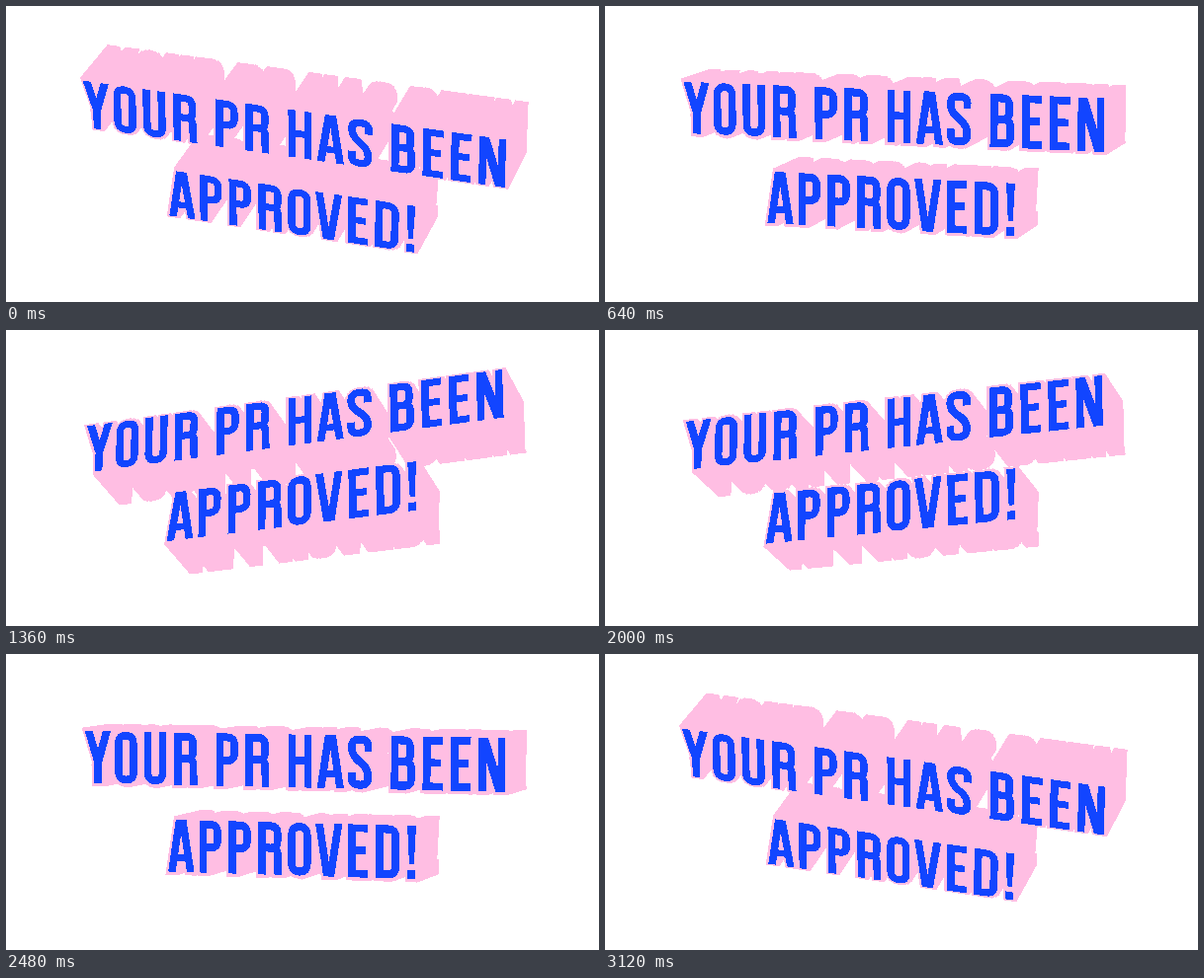
Animation, 600 px wide and 300 px high, one loop 3200 ms. Source, as an HTML page:

```html
<!DOCTYPE html>
<html lang="en">
<head>
<meta charset="utf-8">
<title>Your PR has been approved!</title>
<style>
  html, body { margin: 0; width: 100%; height: 100%; overflow: hidden; background: #fff; }
  svg { display: block; width: 100vw; height: 100vh; }
  path { shape-rendering: crispEdges; }
  #block { fill: #ffbee3; stroke: #ffbee3; stroke-width: 7.6; stroke-miterlimit: 2; }
  #face { fill: #1245ff; }
</style>
</head>
<body>
<svg viewBox="0 0 600 300" role="img" aria-label="Your PR has been approved!">
  <path id="block"/>
  <path id="face"/>
</svg>
<script>
const LINES = ["YOUR PR HAS BEEN", "APPROVED!"];
const LOOP = 3200, STEP = 80;
const CAP = 53, STEM = 8, HALF_HEIGHT = 70.7, SPACE = 12.5, TRACKING = 0.2;
const YAW = 17 * Math.PI / 180, PITCH = 28 * Math.PI / 180;
const HALF_DEPTH = 36, BEVEL = 5, CAMERA = 3000;

// Every letter is a union of convex pieces.
const slant = (top, bottom, y0 = 0, y1 = CAP, w = STEM) =>
  [[[top, y0], [top + w, y0], [bottom + w, y1], [bottom, y1]]];
const stem = (x, y0, y1) => slant(x, x, y0, y1);
const bar = (y, x0, x1, h = 7.6) => slant(x0, x0, y, y + h, x1 - x0);

function roundCorners(points, radius) {
  const toward = (a, b) => {
    const len = Math.hypot(b[0] - a[0], b[1] - a[1]);
    const k = Math.min(radius, len / 2) / len;
    return [a[0] + (b[0] - a[0]) * k, a[1] + (b[1] - a[1]) * k];
  };
  const out = [points[0]];
  for (let i = 1; i < points.length - 1; i++) {
    const c = points[i], a = toward(c, points[i - 1]), b = toward(c, points[i + 1]);
    for (let s = 0; s <= 6; s++) {
      const u = s / 6, v = 1 - u;
      out.push([0, 1].map(k => v * v * a[k] + 2 * u * v * c[k] + u * u * b[k]));
    }
  }
  out.push(points[points.length - 1]);
  return out.filter((p, i) => !i || Math.hypot(p[0] - out[i - 1][0], p[1] - out[i - 1][1]) > 0.01);
}

// A stroke of stem width along a rounded polyline, cut into quads.
function curve(points, radius = 8) {
  const line = roundCorners(points, radius);
  const rims = line.map((p, i) => {
    const a = line[Math.max(0, i - 1)], b = line[Math.min(line.length - 1, i + 1)];
    const dx = b[0] - a[0], dy = b[1] - a[1], k = STEM / 2 / Math.hypot(dx, dy);
    return [[p[0] - dy * k, p[1] + dx * k], [p[0] + dy * k, p[1] - dx * k]];
  });
  return rims.slice(1).map((r, i) => [rims[i][0], r[0], r[1], rims[i][1]]);
}

const TOP = 4, BASE = CAP - 4;
const bowl = (x, y0, y1, r) => curve([[4, y0], [x, y0], [x, y1], [4, y1]], r);
const glyph = (width, left, right, ...parts) => ({ width, left, right, pieces: parts.flat() });

const GLYPHS = {
  " ": glyph(SPACE, 0, 0),
  "!": glyph(9, 4, 4, [[[0, 0], [9, 0], [7, 38], [2, 38]]], stem(0.5, 44)),
  A: glyph(28, 1.2, 1.2, slant(8.3, 0), slant(11.7, 20), bar(35, 5, 23, 7.2)),
  B: glyph(24.5, 4, 3.6, stem(0), bowl(19.5, TOP, 25, 7), bowl(20.5, 25, BASE, 7)),
  D: glyph(24.5, 4, 3.6, stem(0), bowl(20.5, TOP, BASE)),
  E: glyph(20.5, 4, 3.6, stem(0), bar(0, 0, 20.5), bar(22, 0, 18.5), bar(CAP - 7.6, 0, 20.5)),
  H: glyph(24.5, 4, 4, stem(0), stem(16.5), bar(22, 0, 24.5)),
  N: glyph(26.5, 4, 4, slant(0, 0, 0, CAP, 7.4), slant(19.1, 19.1, 0, CAP, 7.4), slant(0, 17, 0, CAP, 9.5)),
  O: glyph(24, 3.2, 3.2, curve([[4, 26], [4, TOP], [20, TOP], [20, BASE], [4, BASE], [4, 26]])),
  P: glyph(23.5, 4, 3.5, stem(0), bowl(19.5, TOP, 27.5)),
  R: glyph(25.5, 4, 2.4, stem(0), bowl(20.3, TOP, 26, 7), curve([[8, 26], [20.3, 26], [21, CAP]], 6)),
  S: glyph(25, 2.5, 2.5, curve([[21, 16], [21, TOP], [4, TOP], [4, 19], [21, 33.5], [21, BASE], [4, BASE], [4, 36.5]])),
  U: glyph(24, 4, 4, curve([[4, 0], [4, BASE], [20, BASE], [20, 0]])),
  V: glyph(28, 1.2, 2, slant(0, 8.3), slant(20, 11.7)),
  Y: glyph(28, 1.2, 1.2, slant(0, 10, 0, 32, 8.6), slant(19.4, 10, 0, 32, 8.6), stem(10.2, 29))
};

function layOut(text, top) {
  let x = 0;
  const placed = [];
  for (const char of text) {
    const g = GLYPHS[char];
    placed.push([x + g.left, g]);
    x += g.left + g.width + g.right + TRACKING;
  }
  const [lastX, last] = placed[placed.length - 1];
  const middle = (placed[0][0] + lastX + last.width) / 2;
  return placed.flatMap(([gx, g]) =>
    g.pieces.map(piece => piece.map(([px, py]) => [px + gx - middle, py + top])));
}

const pieces = [
  ...layOut(LINES[0], -HALF_HEIGHT),
  ...layOut(LINES[1], HALF_HEIGHT - CAP)
];

function projector(pitch) {
  const sa = Math.sin(YAW), ca = Math.cos(YAW), sp = Math.sin(pitch), cp = Math.cos(pitch);
  return z => ([x, y]) => {
    const near = x * sa + z * ca;
    const scale = CAMERA / (CAMERA - near * cp + y * sp);
    return [300 + (x * ca - z * sa) * scale, 150 + (y * cp + near * sp) * scale];
  };
}

function hull(points) {
  const sorted = [...points].sort((a, b) => a[0] - b[0] || a[1] - b[1]);
  const half = list => {
    const out = [];
    for (const p of list) {
      while (out.length > 1) {
        const a = out[out.length - 2], b = out[out.length - 1];
        if ((b[0] - a[0]) * (p[1] - a[1]) - (b[1] - a[1]) * (p[0] - a[0]) > 0) break;
        out.pop();
      }
      out.push(p);
    }
    return out.slice(0, -1);
  };
  return [...half(sorted), ...half(sorted.reverse())];
}

const toPath = points => "M" + points.map(p => p[0].toFixed(2) + " " + p[1].toFixed(2)).join("L") + "Z";
const block = document.getElementById("block");
const face = document.getElementById("face");

// The blue face stands a bevel's depth in front of the wider pink block.
function draw(time) {
  const project = projector(PITCH * Math.cos(2 * Math.PI * time / LOOP));
  const toFace = project(HALF_DEPTH + BEVEL);
  const toFront = project(HALF_DEPTH), toBack = project(-HALF_DEPTH);
  let blockPath = "", facePath = "";
  for (const piece of pieces) {
    facePath += toPath(hull(piece.map(toFace)));
    blockPath += toPath(hull([...piece.map(toFront), ...piece.map(toBack)]));
  }
  block.setAttribute("d", blockPath);
  face.setAttribute("d", facePath);
}

let shown = -1;
function tick() {
  const time = Math.floor(performance.now() % LOOP / STEP) * STEP;
  if (time !== shown) draw(shown = time);
  requestAnimationFrame(tick);
}
tick();
</script>
</body>
</html>
```
